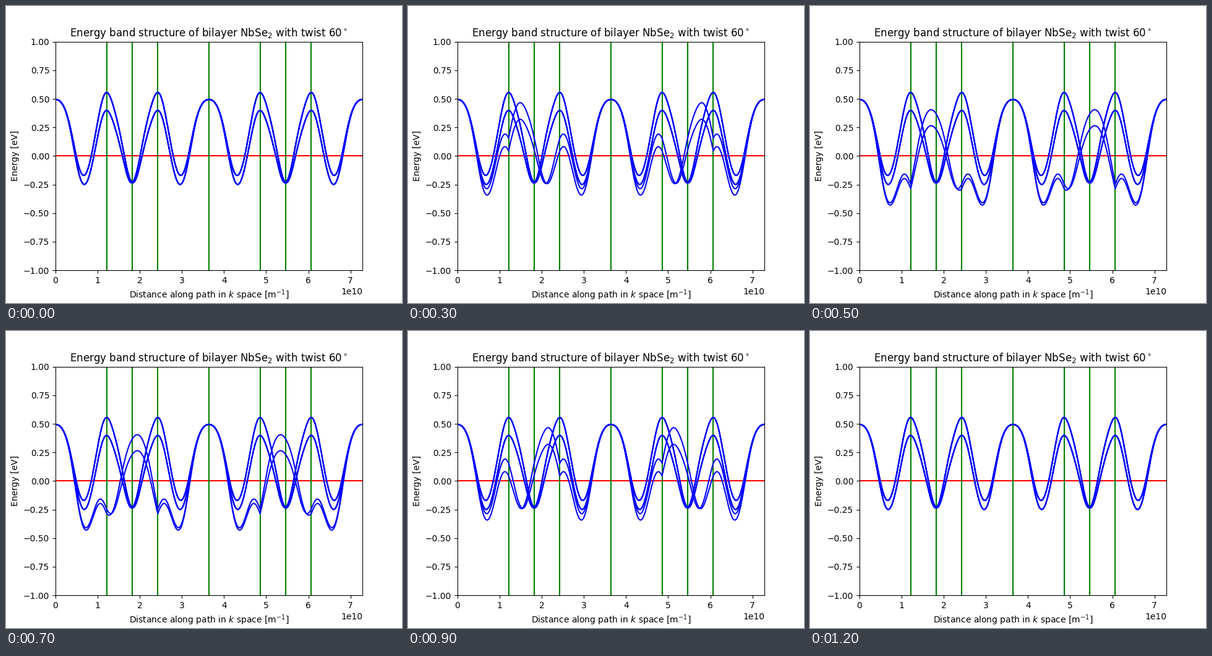
Animation of 640 by 480 pixels, one loop 1.3 s. Source, as a matplotlib script:

```python
import numpy as np
import matplotlib.pyplot as plt
from matplotlib.animation import FuncAnimation

# Three-orbital tight-binding model with third-neighbour hopping (eV)
A = 3.45e-10
E1, E2 = 1.4466, 1.8496
T0, T1, T2, T11, T12, T22 = -0.2308, 0.3116, 0.3459, 0.2795, 0.2787, -0.0539
R0, R1, R2, R11, R12 = 0.0037, -0.0997, 0.0385, 0.0320, 0.0986
U0, U1, U2, U11, U12, U22 = 0.0685, -0.0381, 0.0535, 0.0601, -0.0179, -0.0425
SOC = 0.0784

FRAMES = 13
STEP = 5  # degrees of twist per frame
S3 = np.sqrt(3)
sin, cos = np.sin, np.cos


def lowest_band(k, spin):
    a, b = k[:, 0] * A / 2, k[:, 1] * A * S3 / 2
    ca, cb, sa, sb = cos(a), cos(b), sin(a), sin(b)
    c2a, c2b, s2a, s2b = cos(2*a), cos(2*b), sin(2*a), sin(2*b)
    c3a, s3a, c4a = cos(3*a), sin(3*a), cos(4*a)

    v0 = (E1 + 2*T0*(2*ca*cb + c2a) + 2*R0*(2*c3a*cb + c2b)
          + 2*U0*(2*c2a*c2b + c4a))
    v1 = (-2*S3*T2*sa*sb + 2*(R1 + R2)*s3a*sb - 2*S3*U2*s2a*s2b
          + 1j*(2*T1*sa*(2*ca + cb) + 2*(R1 - R2)*s3a*cb
                + 2*U1*s2a*(2*c2a + c2b)))
    v2 = (2*T2*(c2a - ca*cb) - 2/S3*(R1 + R2)*(c3a*cb - c2b)
          + 2*U2*(c4a - c2a*c2b)
          + 1j*(2*S3*T1*ca*sb + 2/S3*(R1 - R2)*sb*(c3a + 2*cb)
                + 2*S3*U1*c2a*s2b))
    v11 = (E2 + (T11 + 3*T22)*ca*cb + 2*T11*c2a + 4*R11*c3a*cb
           + 2*(R11 + S3*R12)*c2b + (U11 + 3*U22)*c2a*c2b + 2*U11*c4a)
    v12 = (S3*(T22 - T11)*sa*sb + 4*R12*s3a*sb + S3*(U22 - U11)*s2a*s2b
           + 1j*(4*T12*sa*(ca - cb) + 4*U12*s2a*(c2a - c2b)))
    v22 = (E2 + (3*T11 + T22)*ca*cb + 2*T22*c2a + 2*R11*(2*c3a*cb + c2b)
           + 2/S3*R12*(4*c3a*cb - c2b) + (3*U11 + U22)*c2a*c2b + 2*U22*c4a)
    v12 = v12 + 1j * spin * SOC

    h = np.array([[v0, v1, v2],
                  [v1.conj(), v11, v12],
                  [v2.conj(), v12.conj(), v22]])
    return np.linalg.eigvalsh(np.moveaxis(h, -1, 0))[:, 0]


def rotate(k, degrees):
    t = np.radians(degrees)
    return k @ np.array([[cos(t), sin(t)], [-sin(t), cos(t)]])


# Path through the zone: G K M K' G and back again
G = np.zeros(2)
K = np.array([4 * np.pi / (3 * A), 0])
KP = rotate(K, 60)
M = (K + KP) / 2
nodes = [G, K, M, KP, G, KP, M, K, G]
marks = np.cumsum([0] + [np.hypot(*(q - p)) for p, q in zip(nodes, nodes[1:])])
dist = np.concatenate([np.linspace(p, q, 100)
                       for p, q in zip(marks, marks[1:])])
path = np.column_stack([np.interp(dist, marks, [n[i] for n in nodes])
                        for i in (0, 1)])

fig, ax = plt.subplots(figsize=(6.4, 4.8), dpi=100)
ax.set_title(r"Energy band structure of bilayer NbSe$_2$ with twist 60$^\circ$")
ax.set_xlabel(r"Distance along path in $k$ space [m$^{-1}$]")
ax.set_ylabel("Energy [eV]")
ax.set_xlim(0, marks[-1])
ax.set_ylim(-1, 1)

ax.axhline(0, color="red")
for x in marks[1:-1]:
    ax.axvline(x, color="green")

SPINS = (1, -1)
for s in SPINS:
    band = lowest_band(path, s)
    for _ in range(3):  # overlaid strokes give the fixed layer its weight
        ax.plot(dist, band, color="blue")
twisted = [ax.plot([], [], color="blue")[0] for _ in SPINS]


def update(i):
    k = rotate(path, -STEP * i)
    for line, s in zip(twisted, SPINS):
        line.set_data(dist, lowest_band(k, s))
    return twisted


anim = FuncAnimation(fig, update, frames=FRAMES, interval=100,
                     repeat=True, repeat_delay=0)
plt.show()
```
